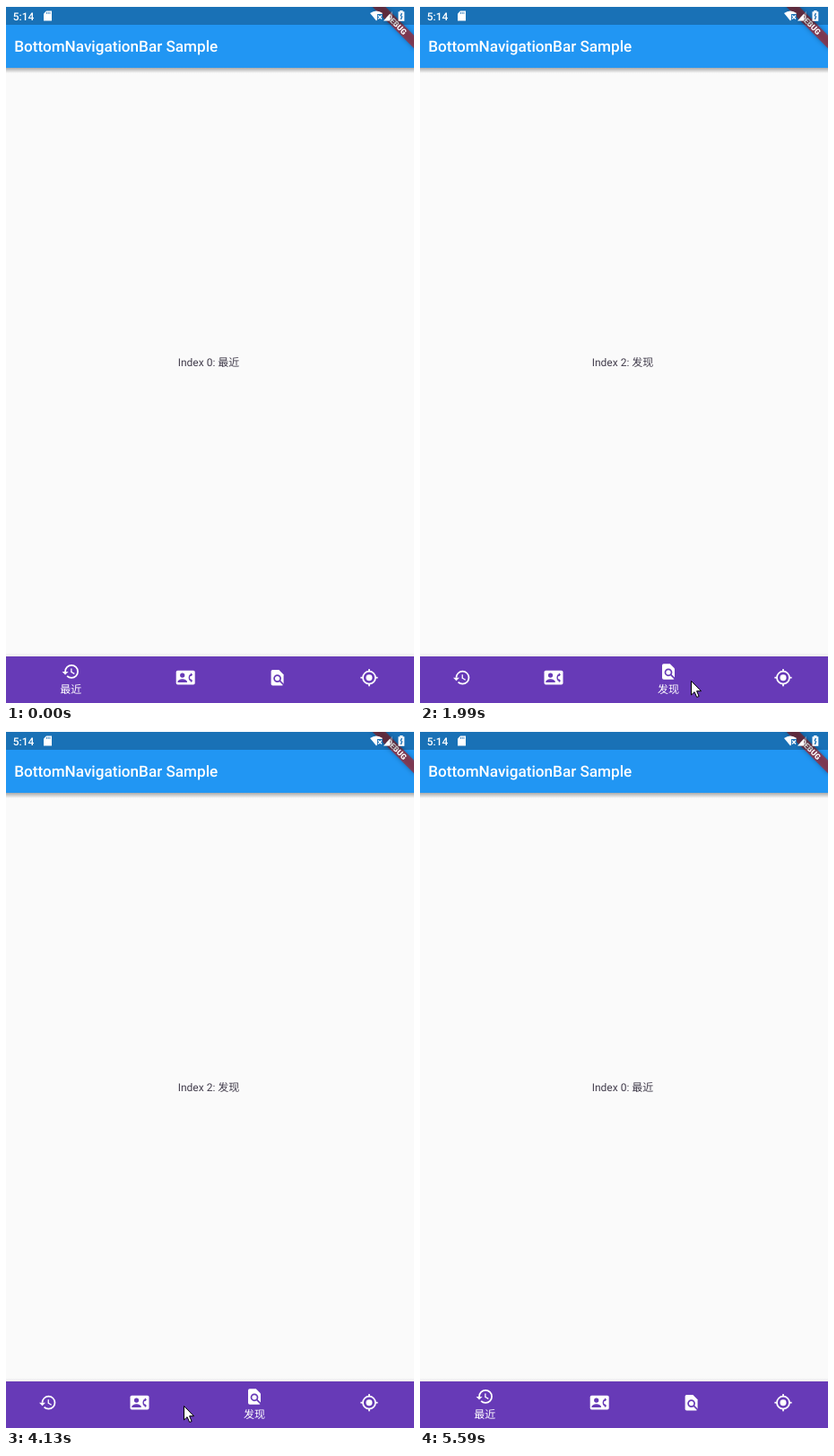
Write an HTML page with a canvas that moves like this. It is 455x778 px and loops after 6130 ms.

```html
<!DOCTYPE html>
<html lang="zh-CN">
<head>
<meta charset="utf-8">
<title>BottomNavigationBar Sample</title>
<style>
html, body { margin: 0; width: 100%; height: 100%; overflow: hidden; background: #fafafa; }
canvas { display: block; }
</style>
</head>
<body>
<canvas id="stage" width="455" height="778"></canvas>
<script>
const W = 455, H = 778, LOOP = 6130;
const TICK = 1000 / 13, TICK_START = 40;
const DP = 0.857, LEFT = -4.6, RIGHT = 456.2, UNIT = 102.4;
const STATUS_END = 21, APP_END = 69, BAR_TOP = 726, BAR_MID = 752;
const BLUE = '#2196f3', DARK_BLUE = '#1970b6', PURPLE = '#673ab7', WHITE = '#fff';
const FONT = 'Roboto, "Noto Sans CJK SC", "Noto Sans CJK", sans-serif';
const LABELS = ['最近', '通讯录', '发现', '我的'];
const ctx = document.getElementById('stage').getContext('2d');

const TAPS = [
  { at: 955, tab: 1 }, { at: 1725, tab: 2 }, { at: 2545, tab: 3 },
  { at: 3780, tab: 2 }, { at: 4545, tab: 1 }, { at: 5140, tab: 0 }
];

// The pointer rests between these moves.
const ENTER = 190, EXIT = 5570;
const MOVES = [
  { at: ENTER, end: ENTER, x: 260, y: 768 },
  { at: ENTER, end: 420, x: 177, y: 749 },
  { at: 540, end: 730, x: 198, y: 745 },
  { at: 1210, end: 1575, x: 302, y: 753 },
  { at: 2030, end: 2190, x: 380, y: 754 },
  { at: 2320, end: 2420, x: 424, y: 754 },
  { at: 2960, end: 3425, x: 263, y: 757, power: 1.6 },
  { at: 3960, end: 4115, x: 198, y: 753 },
  { at: 4115, end: 4425, x: 162, y: 752 },
  { at: 4800, end: 5035, x: 42, y: 753 },
  { at: 5340, end: 5500, x: 386, y: 774 }
];

const lerp = (a, b, k) => a + (b - a) * k;
const clamp = k => Math.max(0, Math.min(1, k));

// cubic-bezier(.4, 0, .2, 1)
function ease(x) {
  if (x <= 0 || x >= 1) return clamp(x);
  let lo = 0, hi = 1, u = 0.5;
  for (let i = 0; i < 24; i++) {
    u = (lo + hi) / 2;
    const bx = 1.2 * u * (1 - u) ** 2 + 0.6 * u * u * (1 - u) + u ** 3;
    if (bx < x) lo = u; else hi = u;
  }
  return u * u * (3 - 2 * u);
}

// The screen refreshes 13 times a second.
const snap = t => Math.max(0, TICK_START + Math.floor((t - TICK_START) / TICK) * TICK);

function pointerAt(t) {
  let { x, y } = MOVES[0];
  for (const m of MOVES.slice(1)) {
    if (t <= m.at) break;
    const k = clamp((t - m.at) / (m.end - m.at)) ** (m.power || 1);
    x = lerp(x, m.x, k);
    y = lerp(y, m.y, k);
  }
  return [Math.round(x), Math.round(y)];
}

function polygon(...points) {
  ctx.beginPath();
  points.forEach(([x, y]) => ctx.lineTo(x, y));
  ctx.closePath();
  ctx.fill();
}

function line(x0, y0, x1, y1) {
  ctx.beginPath();
  ctx.moveTo(x0, y0);
  ctx.lineTo(x1, y1);
  ctx.stroke();
}

function disc(x, y, r) {
  ctx.beginPath();
  ctx.arc(x, y, r, 0, Math.PI * 2);
  ctx.fill();
}

function ring(x, y, r, from = 0, to = Math.PI * 2) {
  ctx.beginPath();
  ctx.arc(x, y, r, from, to);
  ctx.stroke();
}

function ink(color, width = 2) {
  ctx.fillStyle = ctx.strokeStyle = color;
  ctx.lineWidth = width;
}

function text(str, x, y, size, color, weight = 400, align = 'left') {
  ctx.font = `${weight} ${size}px ${FONT}`;
  ctx.textRendering = 'geometricPrecision';
  ctx.textAlign = align;
  ctx.fillStyle = color;
  ctx.fillText(str, x, y);
}

function shade(y0, y1, a0, a1) {
  const g = ctx.createLinearGradient(0, y0, 0, y1);
  g.addColorStop(0, `rgba(0,0,0,${a0})`);
  g.addColorStop(1, `rgba(0,0,0,${a1})`);
  ctx.fillStyle = g;
  ctx.fillRect(0, y0, W, y1 - y0);
}

// Icons live on a 24 unit grid.
function clockIcon() {
  ring(13, 12, 8, Math.PI, Math.PI * 2.75);
  polygon([1, 12], [5, 16], [9, 12]);
  ctx.lineWidth = 1.5;
  line(12.75, 8, 12.75, 13);
  line(12.4, 12.4, 16.7, 14.9);
}

function contactIcon() {
  ctx.beginPath();
  ctx.roundRect(0, 3, 24, 18, 2);
  ctx.fill();
  ink(PURPLE, 1.8);
  disc(8, 9, 3);
  ctx.beginPath();
  ctx.ellipse(8, 17, 6, 3.1, 0, Math.PI, 0);
  ctx.lineTo(14, 18);
  ctx.lineTo(2, 18);
  ctx.fill();
  ring(22, 12, 5.2, Math.PI * 0.76, Math.PI * 1.24);
  polygon([17, 10], [19.5, 10], [21, 8], [19, 6]);
  polygon([17, 14], [19.5, 14], [21, 16], [19, 18]);
}

function pageIcon() {
  ctx.beginPath();
  ctx.moveTo(14, 2);
  ctx.lineTo(20, 8);
  ctx.arcTo(20, 22, 4, 22, 2);
  ctx.arcTo(4, 22, 4, 2, 2);
  ctx.arcTo(4, 2, 14, 2, 2);
  ctx.fill();
  ink(PURPLE);
  ring(12, 13, 4);
  line(15, 16, 20.5, 21.5);
}

function targetIcon() {
  ring(12, 12, 8);
  disc(12, 12, 4);
  for (const p of [1, 20]) {
    ctx.fillRect(11, p, 2, 3);
    ctx.fillRect(p, 11, 3, 2);
  }
}

const ICONS = [clockIcon, contactIcon, pageIcon, targetIcon];

function drawIcon(i, x, y) {
  ctx.save();
  ctx.translate(x, y);
  ctx.scale(DP * 1.02, DP * 1.02);
  ctx.translate(-12, -12);
  ink(WHITE);
  ICONS[i]();
  ctx.restore();
}

function drawBanner() {
  ctx.save();
  ctx.translate(RIGHT, 0);
  ctx.rotate(Math.PI / 4);
  ctx.scale(DP, DP);
  ctx.shadowColor = 'rgba(0,0,0,.5)';
  ctx.shadowBlur = 5;
  ctx.fillStyle = 'rgba(183,28,28,.627)';
  ctx.fillRect(-40, 28, 80, 12);
  ctx.shadowColor = 'transparent';
  text('DEBUG', 0, 37.6, 10.2, WHITE, 900, 'center');
  ctx.restore();
}

function drawStatus() {
  ctx.fillStyle = 'rgba(0,0,0,.25)';
  ctx.fillRect(0, 0, W, STATUS_END);
  text('5:14', 7.8, 15.5, 12, WHITE, 500);

  // memory card
  ink(WHITE);
  polygon([45, 5.5], [51, 5.5], [51, 16.5], [42, 16.5], [42, 8.5]);
  ink(DARK_BLUE);
  for (let x = 45; x < 50; x += 1.8) ctx.fillRect(x, 6.8, 0.8, 2);

  // wifi without connection
  ink(WHITE, 1.3);
  ctx.beginPath();
  ctx.moveTo(413, 16.5);
  ctx.lineTo(406, 8);
  ctx.quadraticCurveTo(413, 2.8, 420, 8);
  ctx.fill();
  ctx.fillStyle = DARK_BLUE;
  ctx.fillRect(414, 9, 6, 8);
  line(415, 10.5, 419, 14.5);
  line(419, 10.5, 415, 14.5);

  // weak signal
  ink('rgba(255,255,255,.3)');
  polygon([431, 5.5], [431, 16.5], [421, 16.5]);
  ink(WHITE);
  polygon([428, 9], [428, 16.5], [421, 16.5]);

  // charging battery
  ctx.fillRect(437.5, 6.3, 6.8, 10.5);
  ctx.fillRect(439.2, 5, 3.4, 1.5);
  ink(DARK_BLUE, 1.4);
  line(441.4, 8, 440, 11.5);
  line(441.8, 11.3, 440.4, 15);
}

function drawBar(t, tap, from, to) {
  const age = tap ? t - tap.at : LOOP;
  const k = ease(age / 200);
  const on = LABELS.map((_, i) => (i === to ? k : 0) + (i === from ? 1 - k : 0));

  shade(BAR_TOP - 4, BAR_TOP, 0, 0.06);
  ctx.fillStyle = PURPLE;
  ctx.fillRect(0, BAR_TOP, W, H - BAR_TOP);

  let x = LEFT;
  const mids = on.map(v => {
    const w = UNIT * (1 + v / 2);
    x += w;
    return x - w / 2;
  });

  if (age < 200) {
    const grow = clamp(age / 35), [px, py] = pointerAt(tap.at);
    ctx.save();
    ctx.beginPath();
    ctx.rect(0, BAR_TOP, W, H - BAR_TOP);
    ctx.clip();
    ctx.fillStyle = `rgba(200,200,200,${0.4 * (1 - age / 200)})`;
    disc(lerp(px, mids[to], grow), lerp(py, BAR_MID, grow), 30 * grow);
    ctx.restore();
  }

  on.forEach((v, i) => {
    drawIcon(i, mids[i], 749.7 - 6.8 * v);
    if (v <= 0) return;
    const size = lerp(12 / 14, 1, v);
    ctx.save();
    ctx.globalAlpha = v;
    ctx.translate(mids[i], 766.5);
    ctx.scale(size, size);
    text(LABELS[i], 0, 0, 12, WHITE, 400, 'center');
    ctx.restore();
  });
}

function drawPointer(t) {
  if (t < ENTER || t >= EXIT) return;
  const [x, y] = pointerAt(t);
  ctx.save();
  ctx.translate(x + 0.5, y + 0.5);
  ink(WHITE);
  polygon([0, 0], [0, 15.5], [3.6, 12.2], [6.2, 18], [8.6, 17], [6.1, 11.2], [11, 11.2]);
  ink('#000', 1);
  ctx.stroke();
  ctx.restore();
}

function draw(t) {
  const past = TAPS.filter(p => p.at <= t);
  const [from, to] = [0, 0, ...past.map(p => p.tab)].slice(-2);

  ctx.fillStyle = '#fafafa';
  ctx.fillRect(0, 0, W, H);
  text(`Index ${to}: ${LABELS[to]}`, 226, 402, 12, '#423d4c', 400, 'center');

  ctx.fillStyle = BLUE;
  ctx.fillRect(0, 0, W, APP_END);
  shade(APP_END, APP_END + 6, 0.32, 0);
  text('BottomNavigationBar Sample', 9.2, 51, 20 * DP, WHITE, 500);

  drawBar(t, past[past.length - 1], from, to);
  drawBanner();
  drawStatus();
  ctx.fillStyle = WHITE;
  ctx.fillRect(0, 0, W, 1);
  drawPointer(t);
}

const begin = performance.now();
function tick() {
  draw(snap((performance.now() - begin) % LOOP));
  requestAnimationFrame(tick);
}
tick();
</script>
</body>
</html>
```
